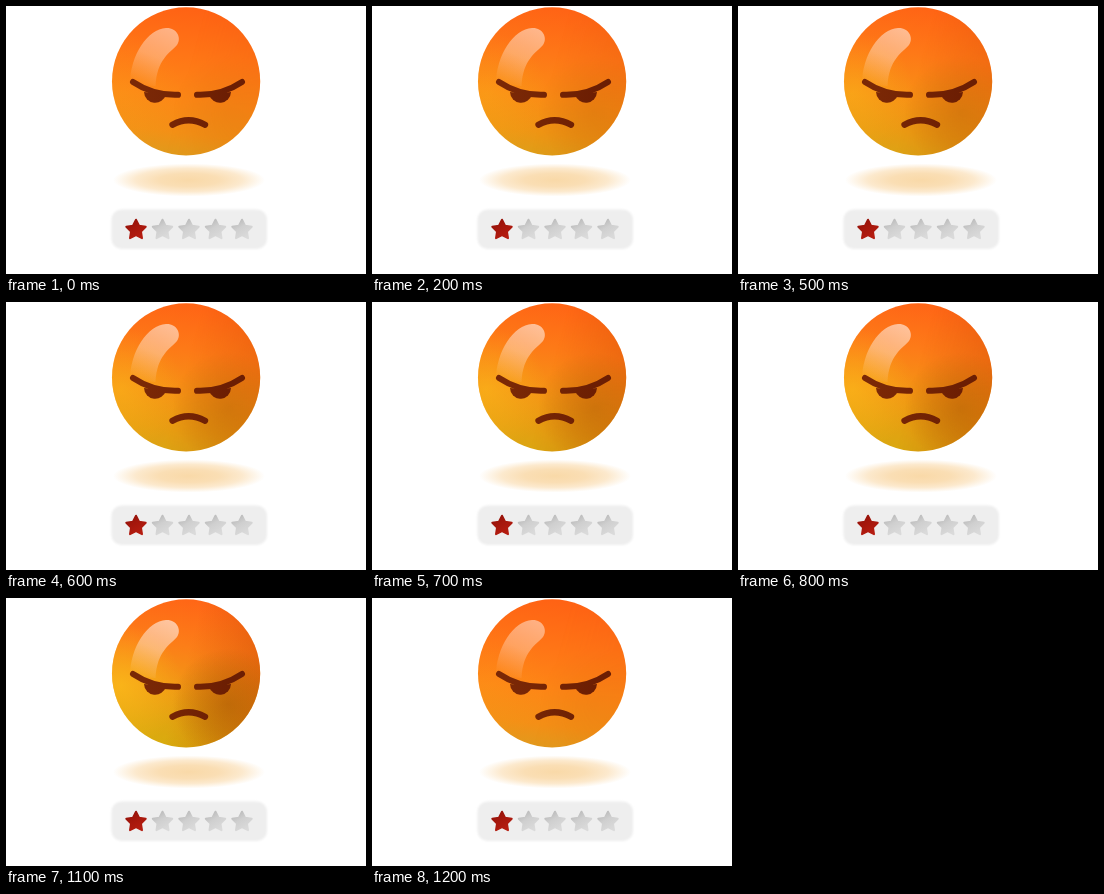
Write an HTML page that moves like this. It is 360 px wide and 268 px high and loops after 1300 ms.

```html
<!DOCTYPE html>
<html lang="en">
<head>
<meta charset="utf-8">
<title>One star rating</title>
<style>
  html, body { margin: 0; width: 100%; height: 100%; overflow: hidden; background: #fff; }
  svg { display: block; width: 100%; height: 100%; }
</style>
</head>
<body>
<svg viewBox="0 0 360 268">
  <defs>
    <circle id="ball" cx="180.100" cy="75.400" r="74.100"/>
    <linearGradient id="skin" gradientUnits="userSpaceOnUse" x1="190" y1="2" x2="172" y2="149"></linearGradient>
    <radialGradient id="shade" gradientUnits="userSpaceOnUse" cx="222" cy="106" r="56">
      <stop offset="0" stop-color="#964c00" stop-opacity=".44"/>
      <stop offset=".5" stop-color="#964c00" stop-opacity=".25"/>
      <stop offset="1" stop-color="#964c00" stop-opacity="0"/>
    </radialGradient>
    <linearGradient id="side" gradientUnits="userSpaceOnUse" x1="180" y1="62" x2="254" y2="82">
      <stop offset="0" stop-color="#c44000" stop-opacity="0"/>
      <stop offset="1" stop-color="#c44000" stop-opacity=".42"/>
    </linearGradient>
    <radialGradient id="warm" gradientUnits="userSpaceOnUse" cx="114" cy="88" r="62">
      <stop offset="0" stop-color="#ffc01c" stop-opacity=".66"/>
      <stop offset=".5" stop-color="#ffc01c" stop-opacity=".34"/>
      <stop offset="1" stop-color="#ffc01c" stop-opacity="0"/>
    </radialGradient>
    <linearGradient id="gloss" gradientUnits="userSpaceOnUse" x1="163" y1="22" x2="138" y2="81">
      <stop offset="0" stop-color="#fff" stop-opacity=".59"/>
      <stop offset=".5" stop-color="#fff" stop-opacity=".4"/>
      <stop offset="1" stop-color="#fff" stop-opacity="0"/>
    </linearGradient>
    <radialGradient id="glow">
      <stop offset="0" stop-color="#f9d9a8"/>
      <stop offset=".4" stop-color="#fadeb4"/>
      <stop offset=".7" stop-color="#fce9cd"/>
      <stop offset="1" stop-color="#fff"/>
    </radialGradient>
    <linearGradient id="ink" gradientUnits="userSpaceOnUse" x1="140" y1="0" x2="222" y2="0">
      <stop offset="0" stop-color="#7a2806"/>
      <stop offset="1" stop-color="#6c1e03"/>
    </linearGradient>
    <linearGradient id="grey" x1="0" y1="0" x2=".6" y2="1">
      <stop offset="0" stop-color="#b2b2b2"/>
      <stop offset=".5" stop-color="#cfcfcf"/>
      <stop offset="1" stop-color="#dadada"/>
    </linearGradient>
    <linearGradient id="red" x1="0" y1="0" x2=".6" y2="1">
      <stop offset="0" stop-color="#8e1008"/>
      <stop offset=".5" stop-color="#a5170c"/>
      <stop offset="1" stop-color="#b51c10"/>
    </linearGradient>
    <filter id="soft" x="-10%" y="-20%" width="120%" height="140%">
      <feGaussianBlur stdDeviation="1.3"/>
    </filter>
  </defs>

  <ellipse cx="183" cy="174" rx="76" ry="16.500" fill="url(#glow)"/>
  <rect x="105.5" y="203.5" width="155.5" height="39.5" rx="10" fill="#eee" filter="url(#soft)"/>
  <g id="stars"></g>

  <use href="#ball" fill="url(#skin)"/>
  <use href="#ball" id="left" fill="url(#warm)"/>
  <g id="right">
    <use href="#ball" fill="url(#side)"/>
    <use href="#ball" fill="url(#shade)"/>
  </g>
  <path id="shine" d="M124 78C124 49 142 23 160 22C171 21.500 176 32 171 39C164 47 151 53 149.500 80Z" fill="url(#gloss)"/>

  <g fill="none" stroke="url(#ink)" stroke-width="6" stroke-linecap="round">
    <path d="M127 76C139 84 154 89.500 172 88.800"/>
    <path d="M236 76C224 84 209 89.500 191 88.800"/>
    <path d="M166.500 118.700Q182.500 109.800 199 118.700" stroke-width="6.300"/>
    <path d="M138 86A11.200 11.200 0 0 0 160 88.500Z" fill="url(#ink)" stroke="none"/>
    <path d="M225 86A11.200 11.200 0 0 1 203 88.500Z" fill="url(#ink)" stroke="none"/>
  </g>
</svg>
<script>
  const LOOP = 1300;
  // [start time, amount of gold]
  const STEPS = [[0, .06], [200, .26], [400, .38], [500, .5], [600, .6],
                 [700, .7], [800, .8], [1000, .9], [1100, 1], [1200, 0]];
  // [offset, warm colour, golden colour]
  const STOPS = [
    [0, [255, 98, 20], [255, 102, 22]],
    [.32, [255, 116, 22], [252, 126, 24]],
    [.62, [253, 134, 22], [240, 154, 20]],
    [.85, [244, 143, 22], [224, 165, 16]],
    [1, [226, 153, 28], [216, 172, 14]]
  ];

  const $ = id => document.getElementById(id);
  function add(parent, tag, attrs) {
    const el = document.createElementNS("http://www.w3.org/2000/svg", tag);
    for (const key in attrs) el.setAttribute(key, attrs[key]);
    return parent.appendChild(el);
  }

  function starPoints(cx, cy, outer, inner) {
    return Array.from({ length: 10 }, (_, i) => {
      const r = i % 2 ? inner : outer;
      const a = i * Math.PI / 5 - Math.PI / 2;
      return (cx + r * Math.cos(a)).toFixed(2) + "," + (cy + r * Math.sin(a)).toFixed(2);
    }).join(" ");
  }

  for (let i = 0; i < 5; i++) {
    const paint = i ? "url(#grey)" : "url(#red)";
    add($("stars"), "polygon", {
      points: starPoints(130 + 26.5 * i, 223.9, 10.2, 5.2),
      fill: paint, stroke: paint, "stroke-width": 2, "stroke-linejoin": "round"
    });
  }

  const stops = STOPS.map(([offset]) => add($("skin"), "stop", { offset }));

  function draw(ms) {
    const t = ms % LOOP;
    const gold = STEPS.filter(([start]) => start <= t).pop()[1];
    STOPS.forEach(([, warm, deep], i) => {
      const mix = warm.map((c, k) => Math.round(c + (deep[k] - c) * gold));
      stops[i].setAttribute("stop-color", `rgb(${mix})`);
    });
    $("left").setAttribute("opacity", .15 + .85 * gold);
    $("right").setAttribute("opacity", .15 + .85 * gold);
    $("shine").setAttribute("opacity", .8 + .2 * gold);
  }

  const begin = performance.now();
  function tick() {
    draw(performance.now() - begin);
    requestAnimationFrame(tick);
  }
  tick();
</script>
</body>
</html>
```
